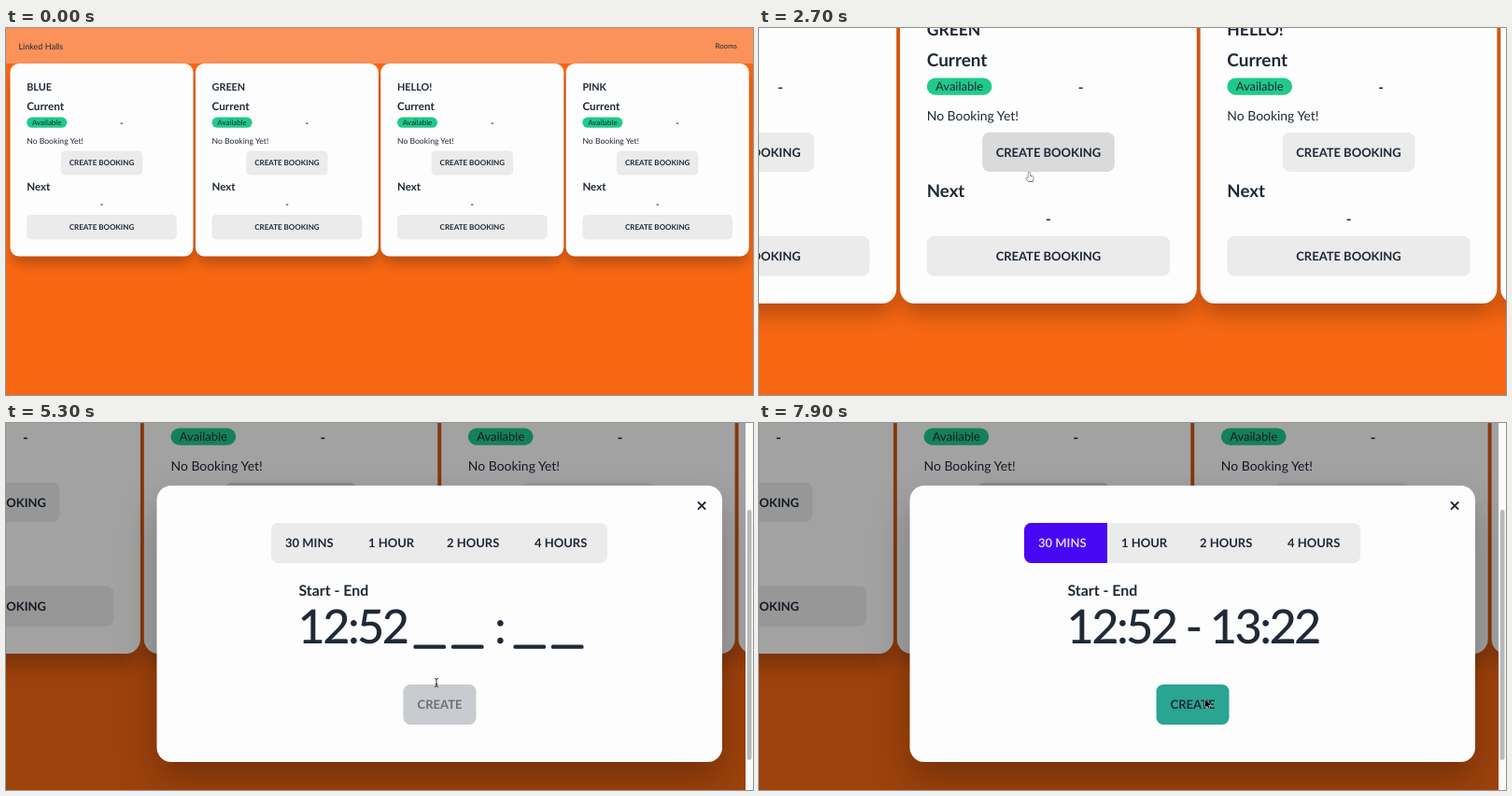
An HTML page with a canvas that plays this animation: 800x393 px, repeating every 8000 ms.

```html
<!DOCTYPE html>
<html lang="en">
<head>
<meta charset="utf-8">
<title>Room booking</title>
<style>
  html, body { margin: 0; width: 100%; height: 100%; overflow: hidden; background: #f76713; }
  canvas { display: block; }
</style>
</head>
<body>
<canvas id="stage" width="800" height="393"></canvas>
<script>
const ctx = document.getElementById('stage').getContext('2d');
const LOOP = 8000, STEP = 100;
const INK = '#1f2937', GREY = '#ebebec', WHITE = '#fdfdfe';
const ZOOM = 0.621, FOCUS = [286.4, 163.3];
const OPEN = 3050, PICK = 6500, HOVER_CREATE = 7400;

// Each key is [time, ...values]; values ease from one key to the next.
const zoomKeys = [[1700, 0], [2545, 1]];
const modalKeys = [[OPEN, 0], [OPEN + 250, 1]];
const panKeys = [[4700, 0], [5240, 1]];
const pointerKeys = [
  [500, 400, 318], [1300, 285, 164], [2200, 286, 163], [2550, 286, 163], [2900, 294, 142],
  [3700, 294, 142], [4600, 461, 278], [5300, 461, 278], [6000, 352, 140],
  [6700, 352, 140], [7600, 478, 296]
];
const pointerShapes = [[500, arrow], [2700, hand], [3900, arrow], [4500, beam], [5600, arrow], [5800, hand], [6900, arrow]];

function track(keys, t) {
  const next = keys.findIndex(k => k[0] > t);
  if (next === 0) return keys[0].slice(1);
  if (next < 0) return keys[keys.length - 1].slice(1);
  const a = keys[next - 1], b = keys[next];
  const u = (t - a[0]) / (b[0] - a[0]), e = u * u * (3 - 2 * u);
  return a.slice(1).map((v, i) => v + (b[i + 1] - v) * e);
}

function box(x, y, w, h, r, color) {
  ctx.fillStyle = color;
  ctx.beginPath();
  ctx.roundRect(x, y, w, h, r);
  ctx.fill();
}

function text(str, x, y, size, weight = 400, color = INK, align = 'left') {
  ctx.font = `${weight} ${size}px Lato, sans-serif`;
  ctx.textAlign = align;
  ctx.fillStyle = color;
  ctx.fillText(str, x, y);
}

function shadow(y, blur, alpha) {
  ctx.shadowColor = `rgba(0,0,0,${alpha})`;
  ctx.shadowOffsetY = y;
  ctx.shadowBlur = blur;
}

function button(label, x, y, w, h, color = GREY) {
  box(x, y, w, h, 4.8, color);
  text(label, x + w / 2, y + h / 2 + 2.9, 8, 700, INK, 'center');
}

function card(name, x, w, hovered) {
  const left = x + 17.7, mid = x + w / 2;
  box(x, 38, w, 206.5, 9.5, WHITE);
  text(name, left, 67.3, 10.8, 700);
  text('Current', left, 87.6, 11.7, 700);
  box(left, 95.6, 43, 11.2, 5.6, '#20ca8b');
  text('Available', left + 21.5, 104, 8, 400, INK, 'center');
  text('-', x + w * 0.609, 105.3, 9.5, 700, INK, 'center');
  text('No Booking Yet!', left, 123.7, 8.6);
  button('CREATE BOOKING', mid - 43.7, 131.5, 87.4, 26, hovered ? '#dadadc' : GREY);
  text('Next', left, 174.2, 11.5, 700);
  text('-', mid, 192, 9.5, 700, INK, 'center');
  button('CREATE BOOKING', left, 200, w - 35.4, 26.5);
}

function page(t, width, scale) {
  const pitch = (width - 6.4) / 4, w = pitch - 2.4;
  const left = i => 4.5 + i * pitch;
  const names = ['BLUE', 'GREEN', 'HELLO!', 'PINK'];
  box(0, 0, width, 38, 0, '#fb925a');
  text('Linked Halls', 13.5, 22.7, 9);
  text('Rooms', width - 17, 22.2, 7.9, 400, INK, 'right');
  shadow(9 * scale, 13 * scale, 0.26);
  names.forEach((_, i) => box(left(i) + 2, 40, w - 4, 203, 9, WHITE));
  shadow(0, 0, 0);
  names.forEach((name, i) => card(name, left(i), w, i === 1 && t >= 2700));
}

function modal(t) {
  const picked = t >= PICK;
  shadow(20, 40, 0.25);
  box(161.5, 67, 605.5, 296, 15.5, WHITE);
  shadow(0, 0, 0);

  ctx.strokeStyle = INK;
  ctx.lineWidth = 1.9;
  ctx.beginPath();
  ctx.moveTo(741, 84.5); ctx.lineTo(749.2, 92.7);
  ctx.moveTo(749.2, 84.5); ctx.lineTo(741, 92.7);
  ctx.stroke();

  box(284, 107, 360, 43, 7.5, GREY);
  if (picked) box(284, 107, 89, 43, [7.5, 0, 0, 7.5], '#4807f3');
  else if (t >= 5900) box(284, 107, t < 6200 ? 172 : 89, 43, [7.5, 0, 0, 7.5], '#e5e5e6');
  ['30 MINS', '1 HOUR', '2 HOURS', '4 HOURS'].forEach((label, i) =>
    text(label, [299, 388, 472, 566][i], 133.2, 13, 700, picked && !i ? '#ddd3fd' : INK));

  const x = picked ? 330.5 : 313.5;
  text('Start - End', x, 184.6, 15.9, 700);
  ctx.letterSpacing = '-2.6px';
  text(picked ? '12:52 - 13:22' : '12:52', x - 1, 236, 50.5, 500);
  if (!picked) {
    text(':', 528, 236, 50.5, 500, INK, 'center');
    for (const dash of [436.5, 477, 543.5, 584]) box(dash, 237.4, 34.5, 4.4, 1.5, INK);
  }
  ctx.letterSpacing = '0px';

  const create = !picked ? '#c8cbcf' : t < HOVER_CREATE ? '#37cdbe' : '#29a592';
  box(425.5, 280, 78, 43, 7.5, create);
  text('CREATE', 464.5, 306.2, 13, 700, picked ? INK : '#6a7079', 'center');
}

function outline(d, fill, stroke) {
  const path = new Path2D(d);
  ctx.lineWidth = 1;
  ctx.strokeStyle = stroke;
  ctx.stroke(path);
  ctx.fillStyle = fill;
  ctx.fill(path);
}

function arrow() {
  outline('M0 0V8.4L1.9 6.7 3.2 9.6 4.6 9 3.4 6.1H6Z', '#000', '#fff');
}

function hand() {
  outline('M-.8 0Q0-.8.8 0V3.4L4 4.2Q4.9 4.6 4.7 6L4 9.6H-.8L-3.2 6.2Q-3-5 5-.8 6Z'
    .replace('Q-3-5 5-.8 6', 'Q-3 4.8-.8 6'), '#fff', '#222');
}

function beam() {
  ctx.strokeStyle = '#222';
  ctx.lineWidth = 0.9;
  ctx.stroke(new Path2D('M-2-4.5Q0-4.5 0-3V3Q0 4.5-2 4.5M2-4.5Q0-4.5 0-3M0 3Q0 4.5 2 4.5M-1.2 1.5H1.2'));
}

function draw(t) {
  const [zoom] = track(zoomKeys, t), [shown] = track(modalKeys, t), [pan] = track(panKeys, t);
  const scale = 1 + ZOOM * zoom, opened = t >= OPEN;
  ctx.textRendering = 'geometricPrecision';
  box(0, 0, 800, 393, 0, '#f76713');

  ctx.save();
  ctx.translate(FOCUS[0] * (1 - scale), FOCUS[1] * (1 - scale) - 48 * pan);
  ctx.scale(scale, scale);
  page(t, opened ? 792 : 800, scale);
  ctx.restore();

  if (opened) {
    box(0, 0, 800, 393, 0, `rgba(0,0,0,${0.36 * shown})`);
    ctx.save();
    ctx.globalAlpha = shown;
    ctx.translate(464.3, 263 - 48 * pan);
    ctx.scale(0.9 + 0.1 * shown, 0.9 + 0.1 * shown);
    ctx.translate(-464.3, -215);
    modal(t);
    ctx.restore();
    box(792, 0, 8, 393, 0, '#fafafa');
    box(793.7, 64 + 29 * pan, 4.8, 268, 2.4, '#b9b9bb');
  }

  const shape = pointerShapes.filter(([start]) => t >= start).pop();
  if (shape) {
    ctx.save();
    ctx.translate(...track(pointerKeys, t));
    shape[1]();
    ctx.restore();
  }
}

function tick(now) {
  draw(Math.floor((now % LOOP) / STEP) * STEP);
  requestAnimationFrame(tick);
}
requestAnimationFrame(tick);
</script>
</body>
</html>
```
